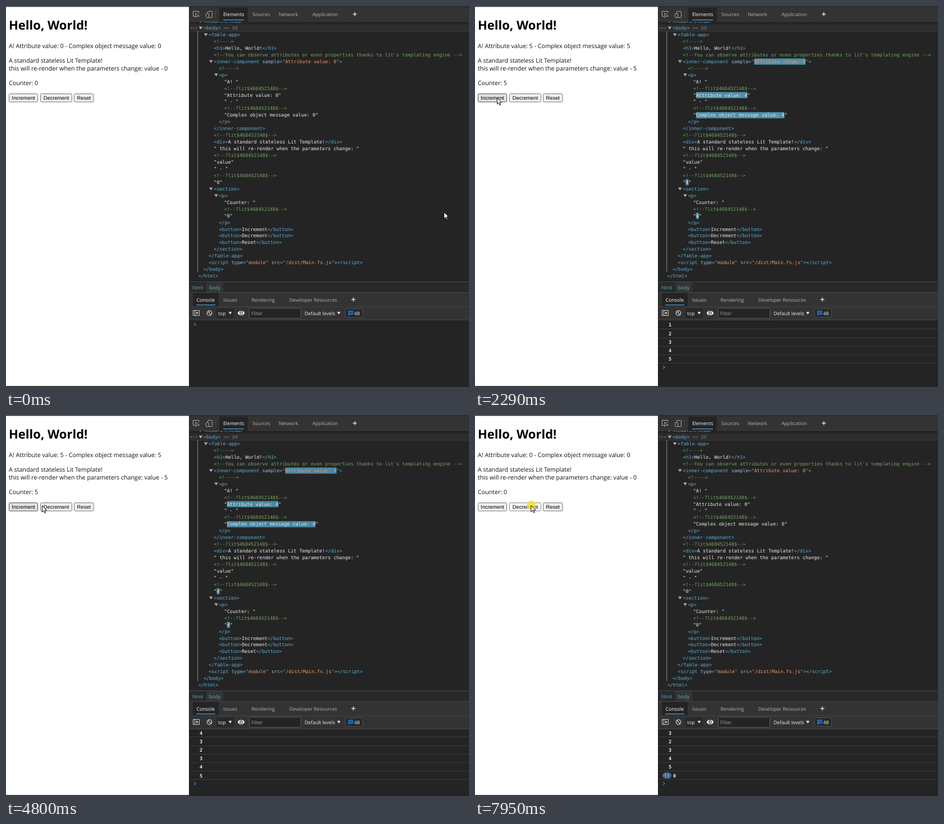
Write an HTML page with a canvas that moves like this. It is 825x679 px and loops after 7.99 s.

```html
<!DOCTYPE html>
<html lang="en">
<head>
<meta charset="utf-8">
<title>Counter with inspector</title>
<style>
html, body { margin: 0; width: 100%; height: 100%; overflow: hidden; background: #fff; }
canvas { display: block; }
</style>
</head>
<body>
<canvas id="stage" width="825" height="679"></canvas>
<script>
const g = document.getElementById('stage').getContext('2d');
const LOOP = 7990, PRESS = 80, DOM_LAG = 150, HOVER_LAG = 60, FLASH = 1400;

const SANS = '"Open Sans", "Noto Sans", sans-serif';
const PAGE = `10.7px ${SANS}`, UI = `8.7px ${SANS}`;
const MONO = '8.45px "DejaVu Sans Mono", monospace';
const CHAR = 5.087, ROW = 11.95;
const BG = '#242424', BAR = '#333333', LINE = '#474747', BLUE = '#5db0d7';

const buttons = [
  { label: 'Increment', x: 5, w: 52 },
  { label: 'Decrement', x: 61, w: 57 },
  { label: 'Reset', x: 121, w: 35.5 }
];

// Pointer path: time, x, y
const path = [
  [0, 780, 367], [30, 780, 367], [450, 330, 245], [810, 98, 171], [940, 39.5, 169],
  [1140, 39.5, 169], [1270, 39, 163], [2640, 39, 163], [2950, 86, 163], [3830, 86, 163],
  [4130, 39, 161], [4720, 39, 161], [4800, 64, 161], [5130, 143, 161], [7400, 143, 161],
  [7740, 99.5, 160.5], [LOOP, 99.5, 160.5]
];

// Mouse releases with the counter value each one leaves
const clicks = [];
let total = 0;
function addClicks(start, step, times, change) {
  for (let i = 0; i < times; i++) {
    total = change(total);
    clicks.push({ t: start + i * step, value: total });
  }
}
const inc = n => n + 1, dec = n => n - 1, reset = () => 0;
addClicks(1560, 170, 7, inc);
addClicks(3080, 170, 5, dec);
addClicks(4370, 175, 3, inc);
addClicks(5340, 0, 1, reset);
addClicks(5740, 175, 10, reset);
const releases = clicks.map(c => c.t).concat(8030);

// Parts start with a colour key; h and H flash on change, # is the counter
const colors = { t: BLUE, c: '#75a465', w: '#ececec', a: '#9bbbdc', v: '#f29766', h: '#ececec', H: '#f29766', g: '#777777' };
const LIT = 'c<!--?lit$468452148$-->';
const tree = [
  [1, 1, 't<body>|g == $0'],
  [2, 1, 't<fable-app>'],
  [3, 0, 'c<!---->'],
  [3, 0, 't<h1>|wHello, World!|t</h1>'],
  [3, 0, "c<!--You can observe attributes or even properties thanks to lit's templating engine -->"],
  [3, 1, 't<inner-component|a sample|t="|HAttribute value: #|t">'],
  [4, 0, 'c<!---->'],
  [4, 1, 't<p>'],
  [5, 0, 'w"A! "'],
  [5, 0, LIT],
  [5, 0, 'w"|hAttribute value: #|w"'],
  [5, 0, 'w" - "'],
  [5, 0, LIT],
  [5, 0, 'w"|hComplex object message value: #|w"'],
  [4, 0, 't</p>'],
  [3, 0, 't</inner-component>'],
  [3, 0, LIT],
  [3, 0, 't<div>|wA standard stateless Lit Template!|t</div>'],
  [3, 0, 'w" this will re-render when the parameters change: "'],
  [3, 0, LIT],
  [3, 0, 'w"value"'],
  [3, 0, 'w" - "'],
  [3, 0, LIT],
  [3, 0, 'w"|h#|w"'],
  [3, 1, 't<section>'],
  [4, 1, 't<p>'],
  [5, 0, 'w"Counter: "'],
  [5, 0, LIT],
  [5, 0, 'w"|h#|w"'],
  [4, 0, 't</p>'],
  [4, 0, 't<button>|wIncrement|t</button>'],
  [4, 0, 't<button>|wDecrement|t</button>'],
  [4, 0, 't<button>|wReset|t</button>'],
  [3, 0, 't</section>'],
  [2, 0, 't</fable-app>'],
  [2, 0, 't<script|a type|t="|vmodule|t"|a src|t="|v/dist/Main.fs.js|t"></' + 'script>'],
  [1, 0, 't</body>'],
  [0, 0, 't</html>']
];

function text(s, x, y, font, color, align = 'left') {
  g.font = font;
  g.fillStyle = color;
  g.textAlign = align;
  g.fillText(s, x, y);
}
function rect(x, y, w, h, color) {
  g.fillStyle = color;
  g.fillRect(x, y, w, h);
}
function box(x, y, w, h, r, fill, stroke) {
  g.beginPath();
  g.roundRect(x, y, w, h, r);
  if (fill) { g.fillStyle = fill; g.fill(); }
  if (stroke) { g.strokeStyle = stroke; g.lineWidth = 1; g.stroke(); }
}
function poly(points, fill, stroke) {
  g.beginPath();
  points.forEach(([x, y]) => g.lineTo(x, y));
  g.closePath();
  if (fill) { g.fillStyle = fill; g.fill(); }
  if (stroke) { g.strokeStyle = stroke; g.lineWidth = 1; g.stroke(); }
}
function disc(x, y, r, fill, stroke) {
  g.beginPath();
  g.arc(x, y, r, 0, 7);
  if (fill) { g.fillStyle = fill; g.fill(); }
  if (stroke) { g.strokeStyle = stroke; g.lineWidth = 1.2; g.stroke(); }
}
const down = (x, y, r, color) => poly([[x - r, y - r * .7], [x + r, y - r * .7], [x, y + r * .9]], color);
function plus(x, y) {
  rect(x - 3.5, y - .6, 7, 1.3, '#eee');
  rect(x - .6, y - 3.5, 1.3, 7, '#eee');
}
function chevron(y) {
  g.beginPath();
  g.moveTo(335, y - 2.6);
  g.lineTo(338, y);
  g.lineTo(335, y + 2.6);
  g.strokeStyle = '#3b8fd8';
  g.lineWidth = 1.2;
  g.stroke();
}

function pointer(t) {
  const i = Math.max(1, path.findIndex(p => p[0] >= t));
  const [t0, x0, y0] = path[i - 1], [t1, x1, y1] = path[i];
  const k = Math.max(0, (t - t0) / (t1 - t0));
  return [x0 + (x1 - x0) * k, y0 + (y1 - y0) * k];
}
function lastClick(t) {
  return clicks.filter(c => c.t <= t).pop() || { t: -1e4, value: 0 };
}
// Time and value of the last real change seen by the inspector
function lastChange(t) {
  let seen = { t: -1e4, value: 0 };
  for (const c of clicks) if (c.t <= t && c.value !== seen.value) seen = c;
  return seen;
}

function mix(a, b, k) {
  return `rgb(${a.map((v, i) => Math.round(v + (b[i] - v) * k))})`;
}
function flashColor(age) {
  const k = age / FLASH;
  if (k < .8) return mix([88, 160, 191], [34, 60, 72], 1 - Math.pow(1 - k / .8, 3));
  return mix([34, 60, 72], [36, 36, 36], (k - .8) / .2);
}

function drawPage(t, pressed) {
  const n = lastClick(t).value;
  rect(0, 0, 326, 679, '#fff');
  text('Hello, World!', 5, 41.7, `bold 22px ${SANS}`, '#000');
  text(`A! Attribute value: ${n} - Complex object message value: ${n}`, 5, 74.5, PAGE, '#111');
  text('A standard stateless Lit Template!', 5, 100.7, PAGE, '#111');
  text(`this will re-render when the parameters change: value - ${n}`, 5, 115.4, PAGE, '#111');
  text(`Counter: ${n}`, 5, 141, PAGE, '#111');

  const [px, py] = pointer(Math.max(0, t - HOVER_LAG));
  for (const b of buttons) {
    const over = px >= b.x && px <= b.x + b.w && py >= 156 && py <= 172;
    const fill = !over ? '#efefef' : pressed ? '#f5f5f5' : '#e2e2e5';
    const edge = !over ? '#767676' : pressed ? '#8d8d8d' : '#4c4c4c';
    box(b.x + .5, 156.5, b.w - 1, 14.5, 2, fill, edge);
    text(b.label, b.x + b.w / 2, 167.2, '9.3px "Liberation Sans", Arial, sans-serif', '#000', 'center');
  }
}

function drawTreeRow([depth, open, spec], y, value, age) {
  let x = 342.7 + 9.2 * depth;
  if (open) down(x - 5, y, 3.3, '#a9a9a9');
  for (const part of spec.split('|')) {
    const key = part[0], s = part.slice(1).replace('#', value), w = s.length * CHAR;
    if ((key === 'h' || key === 'H') && age < FLASH) rect(x, y - 5.2, w, 11, flashColor(age));
    text(s, x, y + 3, key === 'g' ? 'italic ' + MONO : MONO, colors[key]);
    x += w;
  }
}

function drawTree(t) {
  const change = lastChange(t - DOM_LAG);
  const age = t - DOM_LAG - change.t;
  rect(327, 28, 498, 463, BG);
  g.save();
  g.beginPath();
  g.rect(327, 28, 498, 463);
  g.clip();
  poly([[345.5, 24], [345.5, 30], [349, 27]], '#a9a9a9');
  text('<head>…</head>', 351, 30, MONO, BLUE);
  rect(327, 33, 498, 12, '#2d2d2d');
  rect(327, 44.5, 498, 1, '#3c3c3c');
  for (let i = 0; i < 3; i++) rect(329 + i * 4.5, 38.5, 1.6, 1.6, '#999');
  rect(341, 45, 1.2, 429, '#7d7d7d');
  tree.forEach((row, i) => drawTreeRow(row, 39 + i * ROW, change.value, age));
  g.restore();
}

function drawTabs() {
  rect(327, 2, 498, 26, BAR);
  rect(327, 27.5, 498, 1, LINE);
  rect(380, 3, 51, 25, BG);
  rect(387, 24, 37, 1.5, '#3f8fd0');
  text('Elements', 387, 18, UI, '#fff');
  text('Sources', 439, 18, UI, '#b4b4b4');
  text('Network', 486, 18, UI, '#b4b4b4');
  text('Application', 546, 18, UI, '#b4b4b4');
  plus(621.5, 14.5);
  // Inspect and device icons
  g.strokeStyle = '#b0b0b0';
  g.lineWidth = 1;
  g.beginPath();
  g.moveTo(337, 18.5);
  g.lineTo(333.5, 18.5);
  g.lineTo(333.5, 9.5);
  g.lineTo(343.5, 9.5);
  g.lineTo(343.5, 13);
  g.stroke();
  poly([[338, 12.5], [338, 20.5], [340.3, 18.2], [344.5, 18.2]], null, '#b0b0b0');
  box(359.5, 9.5, 8, 11, 1, null, '#b0b0b0');
  box(356.5, 13.5, 5, 7, 1, BAR, '#b0b0b0');
  rect(373, 8, 1, 13, LINE);
}

function drawDrawer() {
  rect(327, 491, 498, 20, '#292929');
  rect(327, 491, 498, 1, LINE);
  rect(357, 492, 30, 18, '#343434');
  text('html', 332, 505, UI, BLUE);
  text('body', 361.8, 505, UI, BLUE);

  rect(327, 510, 498, 49, BAR);
  rect(327, 510, 498, 1, LINE);
  rect(333, 511, 46, 25, BG);
  rect(339, 532, 34, 1.5, '#3f8fd0');
  text('Console', 339.5, 526.7, UI, '#fff');
  text('Issues', 387, 526.7, UI, '#b4b4b4');
  text('Rendering', 437.5, 526.7, UI, '#b4b4b4');
  text('Developer Resources', 504.7, 526.7, UI, '#b4b4b4');
  plus(619, 523);
  rect(327, 535.5, 498, 1, LINE);

  box(333.5, 542.5, 11, 9, 0, null, '#d0d0d0');
  rect(336, 542, 1, 10, '#d0d0d0');
  poly([[339, 544.5], [339, 549.5], [343, 547]], '#d0d0d0');
  disc(362.5, 547.3, 4.2, null, '#e0e0e0');
  g.beginPath();
  g.moveTo(359.6, 544.4);
  g.lineTo(365.4, 550.2);
  g.stroke();
  rect(375, 539, 31, 17, '#282828');
  text('top', 378, 551, UI, '#f0f0f0');
  down(399.5, 547, 3, '#e0e0e0');
  g.beginPath();
  g.ellipse(419, 547.3, 6, 3.9, 0, 0, 7);
  g.fillStyle = '#eee';
  g.fill();
  disc(419, 547.3, 2.7, BAR);
  disc(419, 547.3, 1.5, '#eee');
  box(433.5, 538.5, 92, 18, 1, BG, '#5a5a5a');
  text('Filter', 437, 551, UI, '#a0a0a0');
  text('Default levels', 532, 551, UI, '#f0f0f0');
  down(593, 547, 3, '#e0e0e0');
  box(604.5, 539.5, 31, 15.5, 2, '#282828', '#505050');
  poly([[610, 543], [618.5, 543], [618.5, 550], [612.5, 550], [610, 552.5]], '#1a73d8');
  rect(612, 545, 5, .8, '#222');
  rect(612, 547.2, 5, .8, '#222');
  text('48', 620.5, 551, UI, '#f0f0f0');
}

function drawConsole(t) {
  const logs = [];
  for (const c of clicks) {
    if (c.t > t) break;
    const last = logs[logs.length - 1];
    if (last && last.value === c.value) last.count++;
    else logs.push({ value: c.value, count: 1 });
  }
  const pitch = 15.2, n = logs.length;
  const first = n < 6 ? 568.3 : 642.4 - (n - 1) * pitch;
  rect(327, 559, 498, 118, BG);
  g.save();
  g.beginPath();
  g.rect(327, 559, 498, 118);
  g.clip();
  logs.forEach((log, i) => {
    const y = first + i * pitch;
    let x = 345;
    if (log.count > 1) {
      const w = log.count > 9 ? 16 : 12;
      box(334, y - 5.5, w, 11, 5.5, '#43698f');
      text(log.count, 334 + w / 2, y + 3.1, UI, '#c6d9ec', 'center');
      x = 334 + w + 3;
    }
    text(log.value, x, y + 3.1, 'bold ' + MONO, '#f0f0f0');
    rect(327, Math.round(y + 7), 498, 1, '#3b3b3b');
  });
  chevron(n ? first + n * pitch - .6 : 567.5);
  g.restore();
  rect(327, 559, 498, 1, LINE);
}

function drawPointer(t, pressed) {
  const [x, y] = pointer(t);
  if (pressed) disc(x + .5, y, 8, 'rgba(247, 222, 40, .8)');
  const shape = [[0, 0], [0, 16], [3.8, 12.6], [6.3, 18.4], [8.8, 17.4], [6.3, 11.6], [11.3, 11.4]];
  poly(shape.map(([a, b]) => [x + .5 + a * .72, y + .5 + b * .72]), '#fff', '#111');
}

function draw(t) {
  const pressed = releases.some(r => t >= r - PRESS && t < r);
  g.textRendering = 'geometricPrecision';
  drawPage(t, pressed);
  rect(326, 0, 499, 679, '#1d1d1d');
  drawTabs();
  drawTree(t);
  drawDrawer();
  drawConsole(t);
  rect(0, 0, 825, 1.5, '#333235');
  rect(0, 677.3, 825, 1.7, '#262626');
  drawPointer(t, pressed);
}

let start;
function tick(now) {
  start ??= now;
  draw((now - start) % LOOP);
  requestAnimationFrame(tick);
}
requestAnimationFrame(tick);
</script>
</body>
</html>
```
